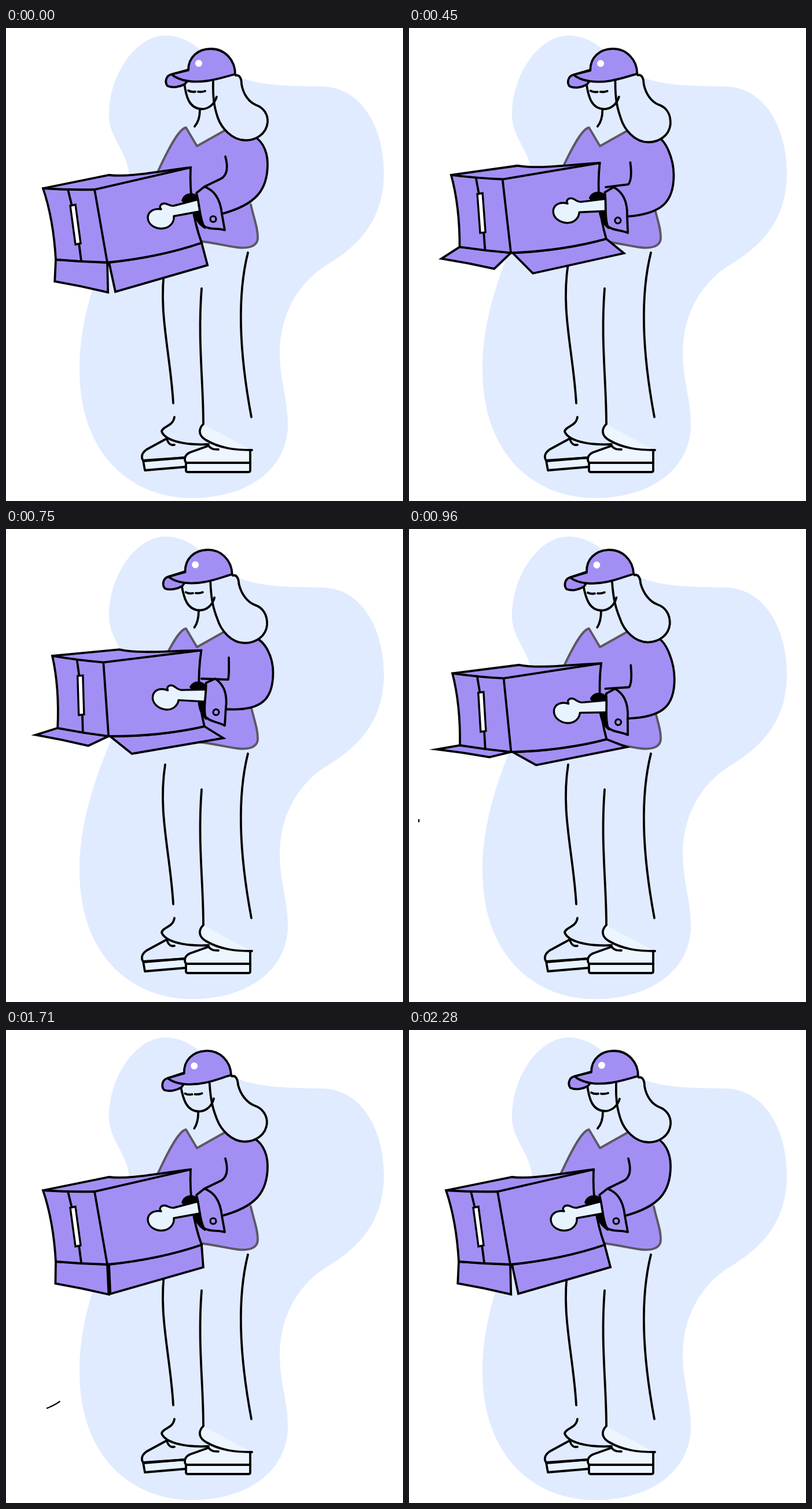
Animation of 686 by 817 pixels, one loop 2.31 s. Source, as an HTML page with a canvas:

```html
<!DOCTYPE html>
<html lang="en">
<head>
<meta charset="utf-8">
<title>Carrying a box</title>
<style>
  html, body { margin: 0; width: 100%; height: 100%; overflow: hidden; background: #fff; }
  canvas { display: block; }
</style>
</head>
<body>
<canvas id="stage" width="686" height="817"></canvas>
<script>
const ctx = document.getElementById('stage').getContext('2d');
const LOOP = 2310, RAD = Math.PI / 180;
const PURPLE = '#a38ff4', SKY = '#e0ebff', PALE = '#e7f3fe', LIGHT = '#edf5ff', INK = '#000', GREY = '#5c5864';

// Key points of the toss: time, drop of the box, its turn, swing of its flaps.
const KEYS = [
  [0, 0, 0, 8],
  [300, -39, 6.7, 14],
  [570, 14, 1.1, 90],
  [765, -32, 6, 72],
  [960, -9, 4.2, 83],
  [1100, 0, 0, 50],
  [1350, 0, 0, 9],
  [1710, 0, 0, -6],
  [LOOP, 0, 0, 8]
];

// Smooth curve through one column of the keys that never overshoots them.
function keyed(column, t) {
  const slope = k => (KEYS[k + 1][column] - KEYS[k][column]) / (KEYS[k + 1][0] - KEYS[k][0]);
  const tangent = k => {
    if (k === 0 || k === KEYS.length - 1) return 0;
    const a = slope(k - 1), b = slope(k);
    return a * b <= 0 ? 0 : 2 * a * b / (a + b);
  };
  const k = KEYS.findIndex(key => key[0] > t) - 1;
  const h = KEYS[k + 1][0] - KEYS[k][0], u = (t - KEYS[k][0]) / h, v = 1 - u;
  return KEYS[k][column] * v * v * (1 + 2 * u) + KEYS[k + 1][column] * u * u * (3 - 2 * u) +
    h * u * v * (v * tangent(k) - u * tangent(k + 1));
}

// The head bows from 120 to 1350 ms and rises until the loop ends.
function headTilt(t) {
  const u = t < 1350 ? Math.max(0, (t - 120) / 1230) : (LOOP - t) / (LOOP - 1350);
  return -2 * (1 - Math.cos(Math.PI * u));
}

function draw(path, fill, stroke = INK, width = 3.8) {
  const shape = new Path2D(path);
  if (fill) { ctx.fillStyle = fill; ctx.fill(shape); }
  if (stroke) { ctx.strokeStyle = stroke; ctx.lineWidth = width; ctx.stroke(shape); }
}

function rotated(x, y, deg) {
  const c = Math.cos(deg * RAD), s = Math.sin(deg * RAD);
  return [x * c - y * s, x * s + y * c];
}

// Paints in coordinates where (px, py) is turned and moved by (dx, dy).
function posed(px, py, dx, dy, deg, paint) {
  ctx.save();
  ctx.translate(px + dx, py + dy);
  ctx.rotate(deg * RAD);
  ctx.translate(-px, -py);
  paint();
  ctx.restore();
}

function drawBlob() {
  draw('M275 13C225 13 178 80 178 150C177 190 213 215 213 260C215 320 127 440 127 590C127 740 220 812 321 812' +
    'C420 812 487 760 487 685C487 640 473 610 473 558C474 500 500 445 550 412C600 382 653 340 653 250' +
    'C653 180 620 102 545 101C480 100 420 100 380 73C340 45 320 13 275 13Z', SKY, null);
}

function drawLegs() {
  draw('M275 407C262 490 284 560 289 648M338 450C331 540 341 610 341 684M418 388C395 480 409 592 424 672');
  draw('M237 747L240 764L311 758V742Z', PALE);
  draw('M278 709L243 728C232 736 234 744 238 748L310 742');
  draw('M278 709C280 719 286 721 291 720');
  draw('M291 672C289 688 270 688 269 697C275 712 305 721 350 719');
  draw('M349 722L318 733C309 737 307 745 311 751H422V731Z', LIGHT, null);
  draw('M342 685L422 728C395 729 370 726 346 712C335 706 330 695 342 685Z', LIGHT, null);
  draw('M341 684C330 695 335 706 346 712C370 726 395 729 425 729');
  draw('M311 751H422V764Q422 767 419 767H314Q311 767 311 764Z', LIGHT);
  draw('M349 722L318 733C309 737 307 745 311 751H422V731');
  draw('M349 720C354 728 360 728 367 728');
}

function drawTorso() {
  const left = 'M256 262C278 213 298 174 311 172L330 204L378 177';
  const hem = 'C430 335 435 345 435 362C435 378 418 381 400 379C380 377 360 370 330 368';
  draw(`${left}L424 190L436 250L423 305${hem}Z`, PURPLE, null);
  draw(`${left}M423 305${hem}`, null, GREY);
}

function drawBox(drop, turn, swing) {
  const s = Math.sin(swing * RAD), c = Math.cos(swing * RAD), out = s * Math.abs(s);
  posed(319, 241, 3.1 * turn, drop, turn, () => {
    ctx.lineJoin = 'miter';
    draw(`M86 400L${85 - 39 * out} ${406 + 32 * c}Q${131 - 39 * out} ${407 + 39 * c}
      ${177 - 39 * out} ${411 + 46 * c}L175 405Z`, PURPLE);
    draw(`M178 405L${184 + 36 * s} ${420 + 36 * c}L${344 + 30 * s} ${378 + 32 * c}L338 371Q265 396 178 405Z`, PURPLE);
    draw('M64 277L178 254C215 258 260 248 319 241Q316 310 338 371Q265 396 175 405Q130 404 86 400Q82 330 64 277Z', PURPLE);
    draw('M64 277Q110 280 153 279L319 241M153 279L175 405M107 279Q123 340 130 402');
    draw('M111 307L120 305L129 372L120 374Z', '#fff', INK, 3.4);
    ctx.lineJoin = 'round';
  });
}

// The hand follows the box; the sleeve hangs between shoulder and cuff.
function drawArm(drop, turn) {
  const cuffX = 358 + .85 * turn, cuffY = 330 + drop + 3 * turn, cuffTurn = 2.3 * turn;
  const onCuff = (x, y) => {
    const [dx, dy] = rotated(x, y, cuffTurn);
    return [cuffX + dx, cuffY + dy];
  };
  const sideX = 452 + 1.6 * turn, sideY = 235 + 1.15 * drop + 8.3 * turn;
  const foldX = 379 + turn, foldY = 222 + drop + 5.3 * turn;
  const [topX, topY] = onCuff(-15, -56);
  const outer = `M424 186C${440 + 1.5 * turn} 190 ${sideX} ${sideY - 25} ${sideX} ${sideY}
    C${sideX} ${sideY + 45} ${cuffX + 74 + turn} ${cuffY - 25 + 4 * turn} ${onCuff(15, -9)}`;
  const corner = `${foldX - 7 + turn} ${foldY + 38}`, inner = `${topX - 4 * turn} ${topY}`;
  draw(`${outer}L${inner}L${corner}L${foldX} ${foldY}L378 179Z`, PURPLE, null);
  draw(`${outer}M${foldX} ${foldY}Q${foldX + 8 - 1.2 * turn} ${foldY + 29} ${corner}L${inner}`);
  posed(358, 330, cuffX - 358, cuffY - 330, cuffTurn, () => {
    const hand = 'M332 296L290 307C283 308 281 304 274 303C267 303 264 309 268 313C254 311 245 318 245 328' +
      'C246 342 261 348 273 346C284 344 291 335 290 325L334 317';
    draw('M304 298C308 285 322 283 331 291L344 346C333 340 327 331 323 316Z', INK, INK, 2);
    draw(hand, PALE, INK, 3.4);
    draw('M343 274C358 280 370 292 373 321L378 349C365 345 352 349 342 342C334 328 335 305 329 285Z', PURPLE);
    draw('M353 330a5 5 0 1 0 10 0a5 5 0 1 0 -10 0', null, INK, 3.2);
  });
}

function drawHead(tilt, sag) {
  // Hair roots follow the head; the ends lag behind and sag.
  const hair = 'M397 82C404 80 407 88 407 97C410 115 420 128 432 133C446 138 453 150 452 163' +
    'C450 183 432 194 414 194C390 194 372 172 366 155C361 140 357 125 358 92';
  draw(hair.replace(/(\d+) (\d+)/g, (_, x, y) => {
    const follow = Math.min(1, Math.max(.4, (190 - y) / 90));
    const [dx, dy] = rotated(x - 350, y - 222, tilt * follow);
    return `${350 + dx} ${222 + dy + (y > 160 ? sag : 0)}`;
  }), SKY);
  posed(350, 222, 0, 0, tilt, () => {
    draw('M308 95C311 118 316 139 338 140C350 140 360 132 364 119');
    draw('M315 108Q320 111 327 110M332 110Q338 111 344 109');
    draw('M315 72L286 80C276 82 274 94 279 100C288 104 300 102 309 97L313 92Z', PURPLE);
    draw('M286 80C300 92 325 95 350 91C370 88 385 82 396 80C396 55 378 36 354 36C332 36 315 50 315 73Z', PURPLE);
    draw('M327 61a6 6 0 1 0 12 0a6 6 0 1 0 -12 0', '#fff', null);
  });
  draw(`M${335 + tilt} 141Q${335 + tilt} 160 ${326 + tilt / 4} 170`);
}

// A short stroke runs along the path, its tail catching up with its tip.
function drawTrail(path, reach, from, to, t) {
  const u = (t - from) / (to - from);
  if (u <= 0 || u >= 1) return;
  ctx.save();
  ctx.lineCap = 'butt';
  ctx.setLineDash([reach * (u - u * u), 999]);
  ctx.lineDashOffset = -reach * u * u;
  draw(path, null, INK, 2.4);
  ctx.restore();
}

function frame(now) {
  const t = now % LOOP;
  const [drop, turn, swing] = [1, 2, 3].map(column => keyed(column, t));
  ctx.fillStyle = '#fff';
  ctx.fillRect(0, 0, 686, 817);
  ctx.lineCap = ctx.lineJoin = 'round';
  drawBlob();
  drawLegs();
  drawTorso();
  drawBox(drop, turn, swing);
  drawArm(drop, turn);
  drawHead(headTilt(t), 4 * Math.max(0, Math.sin(Math.PI * t / 1300)) * (t < 1300));
  drawTrail('M17 501V515C14 525 0 530 5 541L17 565C25 590 50 640 80 679', 120, 930, 1620, t);
  drawTrail('M115 632L107 638L96 639Q88 646 74 652C50 662 25 662 0 655', 105, 1290, 2160, t);
  requestAnimationFrame(frame);
}
requestAnimationFrame(frame);
</script>
</body>
</html>
```
